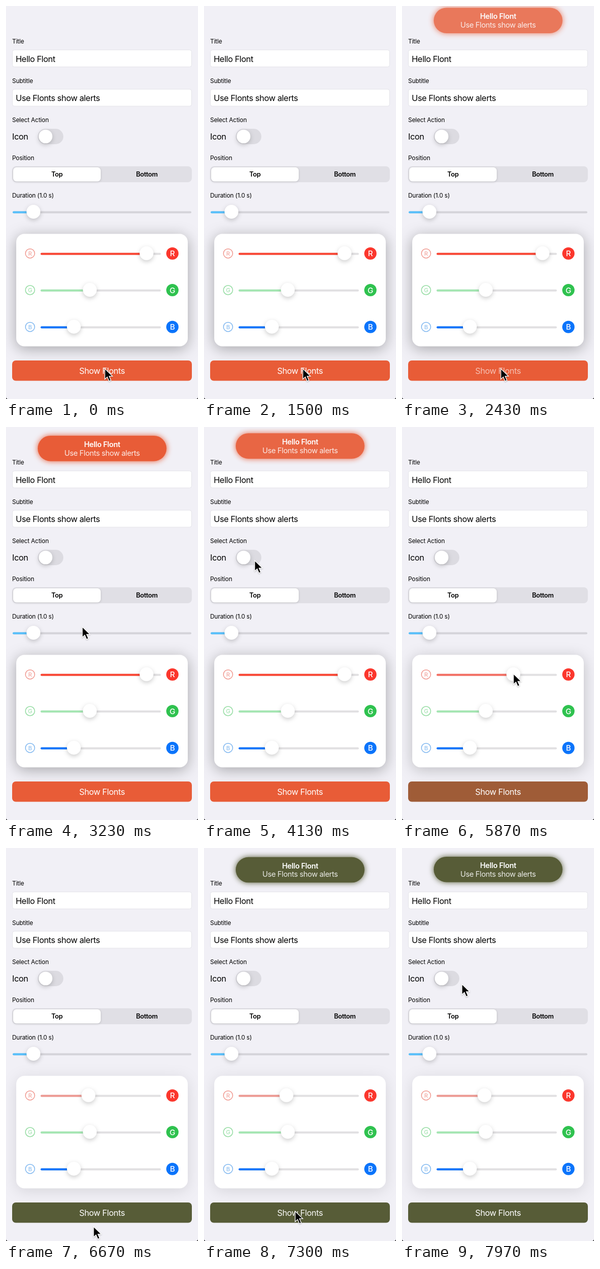
Recreate the animation shown at these times as an HTML page. Size 375x765 px, loop 8 s.

```html
<!DOCTYPE html>
<html lang="en">
<head>
<meta charset="utf-8">
<title>Alert demo</title>
<style>
html, body { margin: 0; width: 100%; height: 100%; overflow: hidden; background: #000; }
svg { display: block; width: 375px; height: 765px; }
text { font: 16.2px Inter, Roboto, sans-serif; letter-spacing: -.025em; fill: #000; }
.label { font-size: 11.8px; letter-spacing: -.015em; }
.mid { text-anchor: middle; letter-spacing: -.025em; }
.seg { font-size: 12.7px; font-weight: 600; }
.field { fill: #fff; stroke: #e4e3e9; }
.knob { fill: #fff; filter: drop-shadow(0 3px 4px rgba(0,0,0,.2)); }
.white { fill: #fff; }
</style>
</head>
<body>
<svg viewBox="0 0 375 765">
  <path d="M0 0H375V761Q375 765 371 765H4Q0 765 0 761Z" fill="#f1f0f6"/>

  <text class="label" x="12" y="73">Title</text>
  <rect class="field" x="12.5" y="85.5" width="350" height="33" rx="4"/>
  <text x="19" y="108.5">Hello Flont</text>
  <text class="label" x="12" y="149.5">Subtitle</text>
  <rect class="field" x="12.5" y="162" width="350" height="33" rx="4"/>
  <text x="19" y="185">Use Flonts show alerts</text>

  <text class="label" x="12" y="226">Select Action</text>
  <text x="12" y="260">Icon</text>
  <rect x="62" y="239" width="50" height="30" rx="15" fill="#dcdbe1"/>
  <circle class="knob" cx="77.3" cy="254" r="13.3"/>

  <text class="label" x="12" y="299.5">Position</text>
  <rect x="12" y="312" width="351" height="31" rx="8" fill="#e0dfe5"/>
  <rect x="14" y="314" width="171" height="27.5" rx="6.5" fill="#fff"
    style="filter:drop-shadow(0 1px 2px rgba(0,0,0,.16))"/>
  <text class="mid seg" x="99.5" y="332.3">Top</text>
  <text class="mid seg" x="275" y="332.3">Bottom</text>

  <text class="label" x="12" y="373">Duration (1.0 s)</text>
  <rect x="13" y="399.5" width="349" height="4" rx="2" fill="#d4d3d9"/>
  <rect x="13" y="399.5" width="40" height="4" rx="2" fill="#56bffb"/>
  <circle class="knob" cx="53.6" cy="400.5" r="13.5"/>

  <rect id="card" x="20" y="443.5" width="335" height="219" rx="16" fill="#fff"/>
  <g id="sliders"></g>

  <rect id="button" x="12" y="690" width="351" height="39.5" rx="7"/>
  <text id="buttonText" class="mid white" x="187.5" y="716">Show Flonts</text>

  <g id="pill">
    <rect id="pillShape" x="62" y="17" width="251.5" height="49.5" rx="24.7"/>
    <text class="mid white" x="187.7" y="39" style="font-size:14.5px;font-weight:600">Hello Flont</text>
    <text class="mid white" x="187.7" y="55.7" style="font-size:14.5px" opacity=".88">Use Flonts show alerts</text>
  </g>

  <path id="cursor" d="M0 0V20.5L4.8 16 8.3 24.3 12 22.7 8.5 14.6H15Z"
    stroke="#fff" stroke-width="1.3" style="filter:drop-shadow(0 1px 1px rgba(0,0,0,.25))"/>
</svg>
<script>
const LOOP = 8000;
const $ = id => document.getElementById(id);

const sliderRow = ([letter, y, x, solid, pale, tint]) => `
  <circle cx="47" cy="${y}" r="9" fill="none" stroke="${pale}" stroke-width="1.5"/>
  <text class="mid" x="47" y="${y + 4}" style="font-size:11px;fill:${pale}">${letter}</text>
  <rect x="67.5" y="${y - 1.2}" width="235" height="4" rx="2" fill="#e1e0e2"/>
  <rect id="fill${letter}" x="67.5" y="${y - 1.2}" width="${x - 67.5}" height="4" rx="2" fill="${tint}"/>
  <circle id="knob${letter}" class="knob" cx="${x}" cy="${y - .5}" r="13.5"/>
  <circle cx="325" cy="${y}" r="12" fill="${solid}"/>
  <text class="mid white" x="325" y="${y + 5.5}" style="font-size:15px;font-weight:500">${letter}</text>`;

$('sliders').innerHTML = [
  ['R', 481.7, 274.5, '#fb372d', '#f0978e', '#fa4432'],
  ['G', 553, 163.7, '#2fc24f', '#93dca1', '#a4e6b2'],
  ['B', 624.7, 132.5, '#0a74fb', '#7db6ef', '#0b73fb'],
].map(sliderRow).join('');

// Pointer stops: time, x, y
const stops = [
  [0, 193, 706], [2540, 193, 706], [3100, 149, 389], [3330, 149, 389],
  [3950, 99, 260], [4250, 99, 260], [5030, 248, 443], [5400, 275, 480],
  [5560, 275, 480], [6180, 161, 481], [6300, 161, 481], [6640, 171, 737],
  [6690, 171, 737], [6840, 178, 707], [7380, 178, 707], [7940, 117, 265],
  [LOOP, 117, 265],
];

const clamp = v => Math.min(1, Math.max(0, v));
const lerp = (a, b, p) => a + (b - a) * p;
const smooth = p => p * p * (3 - 2 * p);

function pointer(t) {
  const i = stops.findIndex(s => s[0] > t);
  const [t0, x0, y0] = stops[i - 1], [t1, x1, y1] = stops[i];
  const p = smooth((t - t0) / (t1 - t0));
  return [lerp(x0, x1, p), lerp(y0, y1, p)];
}

// Lightly underdamped spring from 0 to 1
function spring(ms) {
  if (ms <= 0) return 0;
  const s = ms / 1000;
  return 1 - Math.exp(-9.2 * s) * (Math.cos(6.9 * s) + 1.333 * Math.sin(6.9 * s));
}

const alertShown = t => t < 4500
  ? spring(t - 2215) - clamp((t - 4070) / 250) ** 1.9 * 1.01
  : spring(t - 6900);

// Press dims the caption quickly; release restores it slowly
const pressed = (t, release) => t < release
  ? clamp((t - release + 110) / 60)
  : 1 - clamp((t - release) / 420);

function draw(t) {
  const [x, y] = pointer(t);
  $('cursor').setAttribute('transform', `translate(${x} ${y})`);

  const drag = smooth(clamp((t - 5560) / 620));
  const knobX = lerp(274.5, 161, drag);
  $('knobR').setAttribute('cx', knobX);
  $('fillR').setAttribute('width', knobX - 67.5);
  $('fillR').setAttribute('fill-opacity', lerp(1, .46, drag));
  $('card').style.filter =
    `drop-shadow(0 5px 14px rgba(0,0,0,${lerp(.31, .11, drag)}))`;

  const color = `rgb(${lerp(232, 87, drag)},92,55)`;
  $('button').setAttribute('fill', color);
  $('buttonText').setAttribute('opacity', 1 - .8 * Math.max(pressed(t, 2215), pressed(t, 6900)));

  const shown = alertShown(t);
  $('pillShape').setAttribute('fill', color);
  $('pillShape').style.filter = `drop-shadow(0 0 6px ${color})`;
  $('pill').setAttribute('opacity', clamp(shown));
  $('pill').setAttribute('transform', `translate(0 ${-70 * (1 - shown)})`);
}

function tick() {
  draw(performance.now() % LOOP);
  requestAnimationFrame(tick);
}
tick();
</script>
</body>
</html>
```
